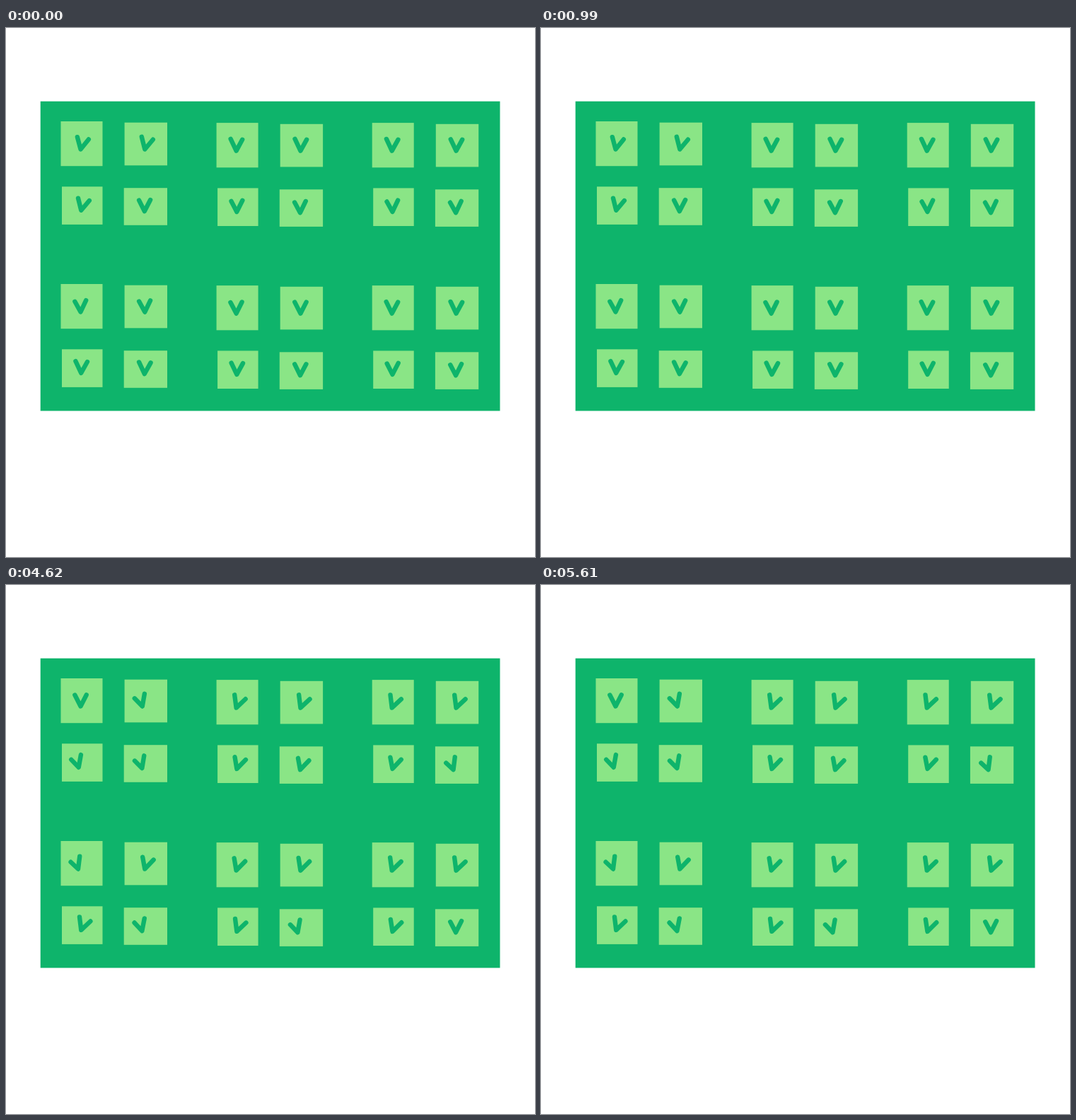
An HTML page that plays this animation: 748x748 px, repeating every 5940 ms.

```html
<!DOCTYPE html>
<html lang="en">
<head>
<meta charset="utf-8">
<title>Green building</title>
<style>
html, body { margin: 0; width: 100%; height: 100%; overflow: hidden; background: #fff; }
svg { display: block; width: 100%; height: 100%; }
.wall { fill: #0eb46b; }
.pane { fill: #8ae586; }
.tick { fill: none; stroke: #0eb46b; stroke-width: 6.4; stroke-linecap: round; stroke-linejoin: round; }
.door { fill: #040704; fill-rule: evenodd; }
</style>
</head>
<body>
<svg viewBox="0 0 748 748">
  <rect class="wall" x="48.7" y="103.7" width="649.8" height="437.7"/>
  <g id="panes"></g>
  <path id="door" class="door" d="M269.3 334L479.3 335L479.5 512H480.5V551.5H479.5V555H449V542H300V556H270V547H269.3Z
    M300 364.8V427.3H356.7V364.8Z M387.6 365.3V427H448.5V365.3Z M300 457.4V511H356.7V457.4Z M387.6 458V511H448.5V458Z"/>
  <g id="ticks"></g>
</svg>
<script>
const STEP = 330;
const LOOP = 18 * STEP;
const DOOR_IN = 5 * STEP;
const DOOR_OUT = 14 * STEP;
const ROWS = 4;
const COLS = 6;

const $ = id => document.getElementById(id);
const add = (parent, tag, attrs) => {
  const node = document.createElementNS('http://www.w3.org/2000/svg', tag);
  for (const key in attrs) node.setAttribute(key, attrs[key]);
  return parent.appendChild(node);
};

// Four panes form a cluster, repeated three across and two down.
const cluster = [
  [77.5, 132, 59, 63.2], [167.6, 133.7, 60.4, 60.6],
  [79, 224.3, 57.5, 53.6], [166.7, 226.2, 61.3, 52.6]
];
const panes = Array.from({ length: ROWS * COLS }, (_, i) => {
  const row = Math.floor(i / COLS);
  const col = i % COLS;
  const across = Math.floor(col / 2);
  const [x, y, width, height] = cluster[row % 2 * 2 + col % 2];
  return {
    x: x + across * 220.1,
    y: y + Math.floor(row / 2) * 230 + (across ? 2.1 : 0),
    width, height
  };
});
panes.forEach(pane => add($('panes'), 'rect', { class: 'pane', ...pane }));
const ticks = panes.map(() => add($('ticks'), 'path', { class: 'tick' }));

// Small repeatable wobble between -1 and 1, as of a hand-drawn stroke.
const wobble = seed => Math.sin(seed * 12.9898);

function tickPath(pane, tilt, seed) {
  const x = pane.x + pane.width / 2 - (tilt < 0 ? 5 : 1.5);
  const y = pane.y + pane.height * 0.625;
  const arm = (side, length) => {
    const angle = (tilt + side * 27 + 2 * wobble(seed)) * Math.PI / 180;
    return `${x + length * Math.sin(angle)} ${y - length * Math.cos(angle)}`;
  };
  const left = (tilt < 0 ? 15 : 17.5) + wobble(seed + 1);
  return `M${arm(-1, left)}L${x} ${y}L${arm(1, 18)}`;
}

// A pose has one common tilt in degrees; some ticks, counted by rows, differ from it.
function makePose(tilt, exceptions) {
  return panes.map((pane, i) => {
    const own = Object.keys(exceptions).find(key => exceptions[key].includes(i));
    return tickPath(pane, Number(own ?? tilt), i);
  });
}
const upright = makePose(0, { 12: [0, 1, 6] });
const leaning = makePose(16, { 0: [0, 6, 12, 18], '-11': [3, 4, 23] });
const swung = makePose(18, { 0: [0, 23], '-18': [1, 6, 7, 11, 12, 19, 21] });

const intro = [upright, swung, leaning, upright, swung];
const outro = [swung, upright, leaning, swung];

function poseAt(time) {
  if (time < DOOR_IN) return intro[Math.floor(time / STEP)];
  if (time < DOOR_OUT) return leaning;
  return outro[Math.floor((time - DOOR_OUT) / STEP)];
}

function render(time) {
  const pose = poseAt(time);
  const open = time >= DOOR_IN && time < DOOR_OUT;
  $('door').setAttribute('visibility', open ? 'visible' : 'hidden');
  ticks.forEach((tick, i) => tick.setAttribute('d', pose[i]));
}

const start = performance.now();
function loop() {
  render((performance.now() - start) % LOOP);
  requestAnimationFrame(loop);
}
loop();
</script>
</body>
</html>
```
